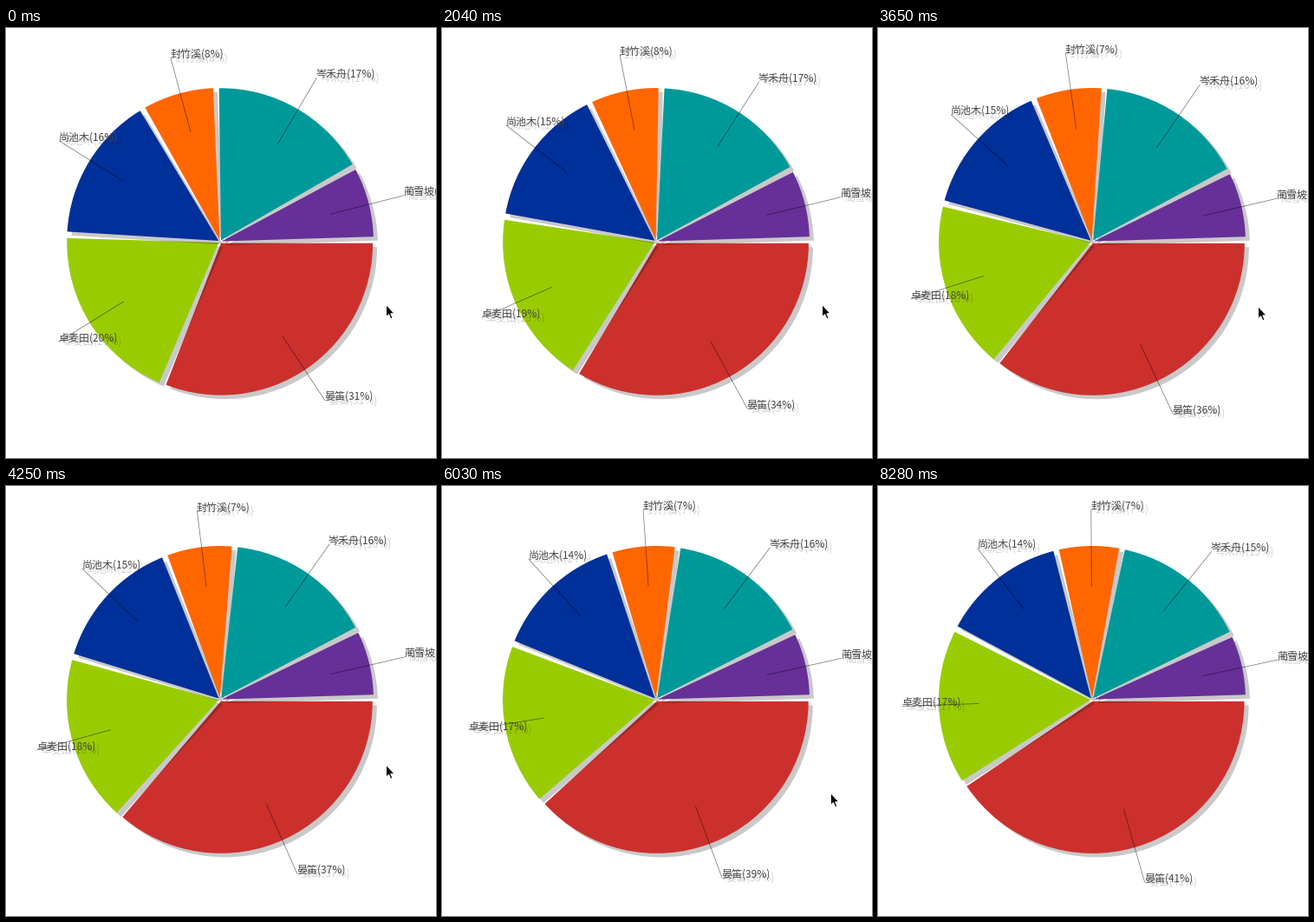
Write a matplotlib script that moves like this. It is 496 by 495 pixels and loops after 8380 ms.

```python
import math

import matplotlib.pyplot as plt
import numpy as np
from matplotlib.animation import FuncAnimation
from matplotlib.patches import Polygon, Wedge

WIDTH, HEIGHT, DPI = 496, 495, 100
FRAMES, INTERVAL = 419, 20
PX = 72 / DPI

CX, CY, RADIUS = 247, 246, 175
LINE_RADII = RADIUS * np.array([0.75, 1.25])
EXPLODE = 2  # each slice is pushed outwards
GAP = 1.75  # degrees left free after each slice
SHADOW = (5, 4.5)
FIRST_START, FIRST_RATE = 43.35, 2.73  # the first slice grows per second

# label, value, colour; clockwise from three o'clock
SLICES = [
    ("晏笛", FIRST_START, "#cc302d"),
    ("卓麦田", 27, "#99cc00"),
    ("尚池木", 21.9, "#003099"),
    ("封竹溪", 11, "#ff6600"),
    ("岑禾舟", 24, "#009999"),
    ("蔺雪坡", 10.8, "#663098"),
]

ARROW = np.array([(0, 0), (0, 14), (3.1, 11.2), (5.3, 16.2),
                  (7.5, 15.3), (5.3, 10.3), (9.6, 10.3)])
# time, x, y of the pointer tip
POINTER_PATH = np.array([
    (0, 438.5, 318.5), (2.1, 438.5, 318.5), (3.6, 438.5, 320.5),
    (4.9, 438.5, 321.5), (5.5, 438.5, 321.5), (6.03, 448.5, 354),
    (6.3, 454, 380), (6.95, 478, 505)])

fig = plt.figure(figsize=(WIDTH / DPI, HEIGHT / DPI), dpi=DPI, facecolor="white")
ax = fig.add_axes([0, 0, 1, 1])
ax.set_xlim(0, WIDTH)
ax.set_ylim(HEIGHT, 0)
ax.axis("off")


def make_wedge(color, alpha, z):
    return ax.add_patch(Wedge((CX, CY), RADIUS, 0, 1, facecolor=color,
                              alpha=alpha, linewidth=0, zorder=z))


def make_text(color, alpha, z):
    return ax.text(0, 0, "", color=color, alpha=alpha, zorder=z,
                   fontname="Noto Sans CJK JP", fontsize=12 * PX,
                   ha="left", va="baseline", parse_math=False)


class Slice:
    def __init__(self, name, color, order):
        self.name = name
        # a slice's shadow also falls on the slices drawn before it
        self.shadow = make_wedge("black", 0.21, 1 + order / 10)
        self.wedge = make_wedge(color, 1, 1.05 + order / 10)
        self.line, = ax.plot([], [], color="black", alpha=0.5,
                             linewidth=0.8 * PX, zorder=3)
        self.ghost = make_text("black", 0.18, 4)
        self.label = make_text("#484848", 1, 5)

    def place(self, start, end, percent):
        middle = math.radians((start + end) / 2)
        ux, uy = math.cos(middle), math.sin(middle)
        for wedge, dx, dy in ((self.wedge, 0, 0), (self.shadow, *SHADOW)):
            wedge.set_center((CX + EXPLODE * ux + dx, CY + EXPLODE * uy + dy))
            wedge.set_theta1(start)
            wedge.set_theta2(end - GAP)

        xs, ys = CX + LINE_RADII * ux, CY + LINE_RADII * uy
        self.line.set_data(xs, ys)
        caption = f"{self.name}({percent}%)"
        for text, dx, dy in ((self.label, 0, 0), (self.ghost, 5, 4.5)):
            text.set_text(caption)
            text.set_position((xs[1] - 0.7 + dx, ys[1] - 0.8 + dy))


slices = [Slice(name, color, i) for i, (name, _, color) in enumerate(SLICES)]
rest = [value for _, value, _ in SLICES[1:]]
pointer = ax.add_patch(Polygon(ARROW, closed=True, facecolor="black",
                               edgecolor="white", linewidth=PX, zorder=6))


def update(frame):
    t = frame * INTERVAL / 1000
    shares = np.array([FIRST_START + FIRST_RATE * t] + rest)
    shares /= shares.sum()
    edges = np.concatenate(([0], np.cumsum(shares))) * 360
    for part, share, start, end in zip(slices, shares, edges, edges[1:]):
        part.place(start, end, int(100 * share + 0.5))

    times, xs, ys = POINTER_PATH.T
    pointer.set_xy(ARROW + (np.interp(t, times, xs), np.interp(t, times, ys)))
    return []


anim = FuncAnimation(fig, update, frames=FRAMES, interval=INTERVAL,
                     init_func=lambda: update(0), repeat=True, repeat_delay=0)
plt.show()
```
